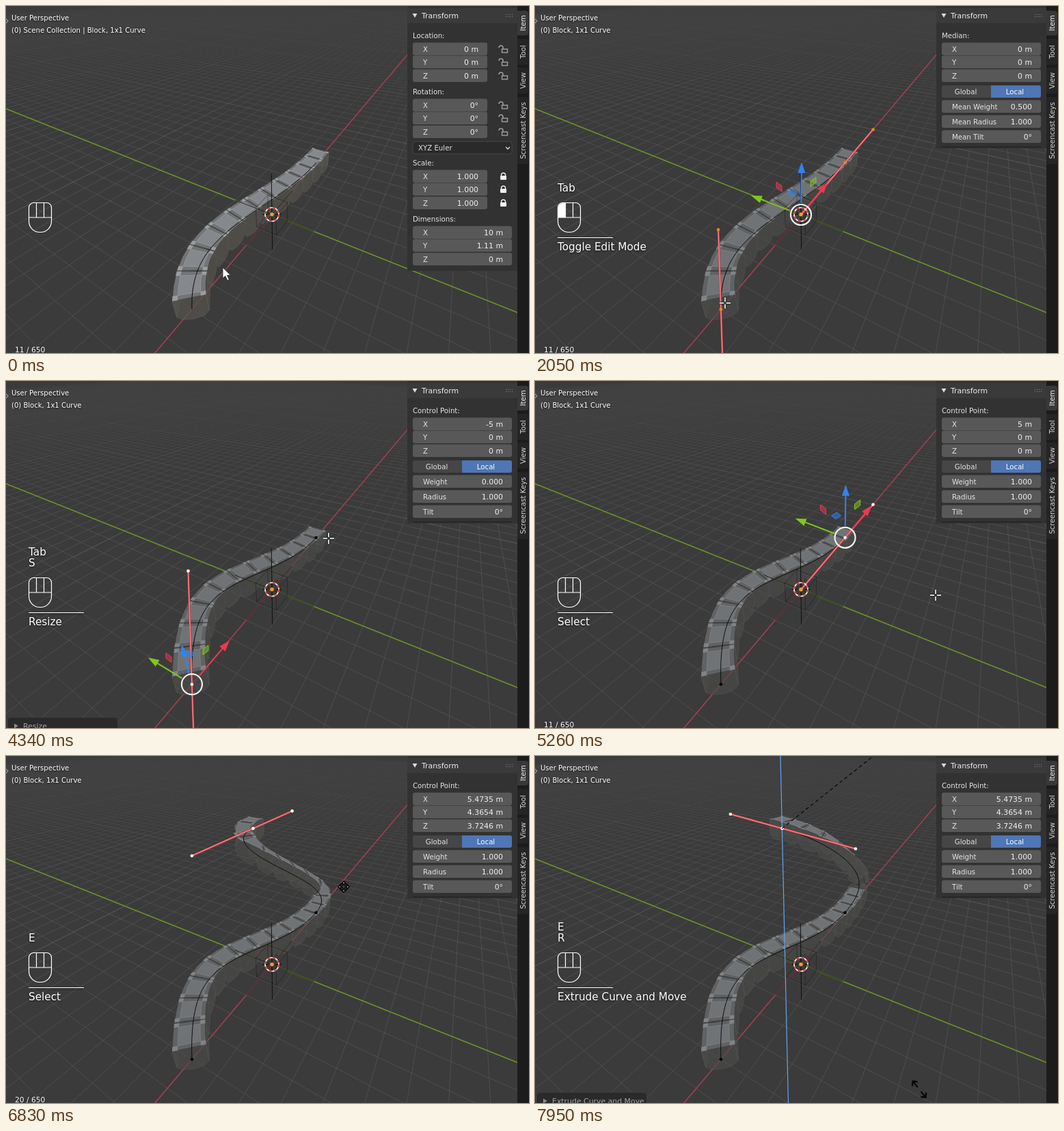
Animation of 765x507 px, one loop 8000 ms. Source, as an HTML page with a canvas:

```html
<!DOCTYPE html>
<html lang="en">
<head>
<meta charset="utf-8">
<title>Curve blocks</title>
<style>
html, body { margin: 0; width: 765px; height: 507px; overflow: hidden; background: #3b3b3b; }
canvas { display: block; }
</style>
</head>
<body>
<canvas id="stage" width="765" height="507"></canvas>
<script>
const ctx = document.getElementById('stage').getContext('2d');
const W = 765, H = 507, LOOP = 8000;
const FONT = '"DejaVu Sans", sans-serif';
const T = { click: 1000, edit: 1640, pick: 2110, scale: 2740, scaled: 3850, pick2: 4560,
            clear: 5100, extrude: 5600, placed: 6900, rotate: 7100 };

// ---- vectors and camera
const add = (a, b, k = 1) => a.map((v, i) => v + b[i] * k);
const cross = (a, b) => [a[1] * b[2] - a[2] * b[1], a[2] * b[0] - a[0] * b[2], a[0] * b[1] - a[1] * b[0]];
const unit = a => { const l = Math.hypot(...a) || 1; return a.map(v => v / l); };
const mix = (a, b, k) => a.map((v, i) => v + (b[i] - v) * k);
const depth = p => 1 + 0.0578 * p[0] + 0.0337 * p[1] - 0.042 * p[2];
function project(p) {
  const w = depth(p);
  return [(389 + 39.13 * p[0] - 15.69 * p[1] - 16.7 * p[2]) / w,
          (305 - 2.02 * p[0] - 1.18 * p[1] - 40.4 * p[2]) / w];
}

// piecewise linear track of [time, ...values]
function track(keys, t) {
  let i = 0;
  while (i < keys.length - 1 && keys[i + 1][0] <= t) i++;
  const a = keys[i], b = keys[i + 1];
  if (!b || t <= a[0]) return a.slice(1);
  return mix(a, b, (t - a[0]) / (b[0] - a[0])).slice(1);
}
const pointerPath = [
  [370, 317, 382], [580, 300, 353], [1550, 300, 353], [1990, 278, 434], [2130, 278, 434],
  [2320, 368, 425], [2470, 526, 404], [2740, 526, 404], [3420, 647, 380], [3700, 690, 374],
  [3850, 690, 374], [4340, 472, 230], [4480, 454, 228], [4640, 454, 228], [5260, 586, 313],
  [5600, 587, 310], [5990, 605, 270], [6830, 494, 191], [7100, 482, 204], [7550, 615, 150], [7950, 562, -53]];
const extrudePath = [[5600, 5, 0, 0], [5990, 6.0814, -0.14641, 1.2441], [6830, 5.4735, 4.3654, 3.7246]];

// ---- drawing helpers
function trace(pts, close) {
  ctx.beginPath();
  pts.forEach(p => ctx.lineTo(p[0], p[1]));
  if (close) ctx.closePath();
}
function line(pts, color, width = 1) {
  trace(pts); ctx.strokeStyle = color; ctx.lineWidth = width; ctx.stroke();
}
function shape(pts, fill, stroke, width = 1) {
  trace(pts, true);
  if (fill) { ctx.fillStyle = fill; ctx.fill(); }
  if (stroke) { ctx.strokeStyle = stroke; ctx.lineWidth = width; ctx.stroke(); }
}
function disc(p, r, fill, stroke, width = 1) {
  ctx.beginPath(); ctx.arc(p[0], p[1], r, 0, 7);
  if (fill) { ctx.fillStyle = fill; ctx.fill(); }
  if (stroke) { ctx.strokeStyle = stroke; ctx.lineWidth = width; ctx.stroke(); }
}
function box(x, y, w, h, fill, r = 0, stroke) {
  ctx.beginPath(); ctx.roundRect(x, y, w, h, r);
  ctx.fillStyle = fill; ctx.fill();
  if (stroke) { ctx.strokeStyle = stroke; ctx.lineWidth = 1; ctx.stroke(); }
}
function text(s, x, y, size = 10.2, color = '#e4e4e4', align = 'left') {
  ctx.font = `${size}px ${FONT}`; ctx.textAlign = align; ctx.fillStyle = color; ctx.fillText(s, x, y);
}
function shadowed(draw) {
  ctx.shadowColor = 'rgba(0,0,0,.7)'; ctx.shadowBlur = 3; ctx.shadowOffsetY = 1;
  draw();
  ctx.shadowColor = 'transparent'; ctx.shadowBlur = ctx.shadowOffsetY = 0;
}
function segment(a, b, color, width) {
  const near = 0.12, wa = depth(a), wb = depth(b);
  if (wa < near && wb < near) return;
  if (wa < near) a = mix(a, b, (near - wa) / (wb - wa));
  if (wb < near) b = mix(b, a, (near - wb) / (depth(a) - wb));
  line([project(a), project(b)], color, width);
}

// ---- floor
function floor() {
  const far = 120;
  for (let i = -70; i <= 110; i++) {
    if (!i) continue;
    const color = i % 10 ? 'rgba(94,94,94,.55)' : 'rgba(100,100,100,.75)';
    segment([-far, i, 0], [far, i, 0], color);
    segment([i, -far, 0], [i, far, 0], color);
  }
  const haze = ctx.createLinearGradient(0, 0, 0, 240);
  haze.addColorStop(0, 'rgba(59,59,59,.86)');
  haze.addColorStop(1, 'rgba(59,59,59,0)');
  ctx.fillStyle = haze; ctx.fillRect(0, 0, W, 240);
  segment([-far, 0, 0], [far, 0, 0], '#a8424f', 1.5);
  segment([0, -far, 0], [0, far, 0], '#68922c', 1.6);
}

// ---- curve
function sampleCurve(nodes) {
  const out = [], n = 64;
  for (let k = 0; k + 1 < nodes.length; k++) {
    const a = nodes[k], b = nodes[k + 1];
    for (let i = k ? 1 : 0; i <= n; i++) {
      const t = i / n, q = 1 - t;
      const pos = [0, 1, 2].map(c => q * q * q * a.at[c] + 3 * q * q * t * a.right[c] +
        3 * q * t * t * b.left[c] + t * t * t * b.at[c]);
      out.push({ pos, s: 0 });
    }
  }
  out.forEach((o, i) => {
    const prev = out[Math.max(0, i - 1)], next = out[Math.min(out.length - 1, i + 1)];
    o.dir = unit(add(next.pos, prev.pos, -1));
    o.side = unit(cross([0, 0, 1], o.dir));
    o.up = cross(o.dir, o.side);
    if (i) o.s = prev.s + Math.hypot(...add(o.pos, prev.pos, -1));
  });
  return out;
}
function place(curve, s, a, b) {
  const last = curve[curve.length - 1];
  let i = curve.findIndex(o => o.s >= s);
  if (i < 0) i = curve.length - 1;
  const o = curve[i], prev = curve[Math.max(0, i - 1)];
  let p;
  if (s > last.s) p = add(last.pos, last.dir, s - last.s);
  else p = i ? mix(prev.pos, o.pos, (s - prev.s) / (o.s - prev.s || 1)) : o.pos;
  return add(add(p, o.side, a), o.up, b);
}

// ---- blocks along the curve
const U = [[0, .5], [1, .5], [1, -.25], [.84, -.43], [.5, -.5], [.16, -.43], [0, -.25]];
function blockFaces(curve, i, count) {
  const at = (s, a, b) => place(curve, i + .02 + s * .96, a, b);
  const wall = a => U.map(([s, b]) => project(at(s, a, b)));
  const cap = s => U.map(([a, b]) => project(at(s, a - .5, b)));
  const patch = (s0, s1, a0, a1) => {
    const mid = (s0 + s1) / 2;
    return [[s0, a0], [mid, a0], [s1, a0], [s1, a1], [mid, a1], [s0, a1]].map(([s, a]) => project(at(s, a, .5)));
  };
  const walls = [wall(.5), wall(-.5)];
  if (i === count - 1) walls.unshift(cap(1));
  if (i === 0) walls.push(cap(0));
  const top = patch(0, 1, -.5, .5);
  const area = top.reduce((sum, p, k) => {
    const q = top[(k + 1) % top.length];
    return sum + p[0] * q[1] - q[0] * p[1];
  }, 0);
  return { walls, top, patch, front: area < 0, far: depth(place(curve, i + .5, 0, 0)) };
}
function chain(curve, count, edit, outlined) {
  const blocks = Array.from({ length: count }, (_, i) => blockFaces(curve, i, count)).sort((a, b) => b.far - a.far);
  if (outlined) {
    blocks.forEach(b => [...b.walls, b.top].forEach(f => shape(f, null, '#ed8a2e', 3)));
    blocks.forEach(b => [...b.walls, b.top].forEach(f => shape(f, '#3b3b3b')));
  }
  const look = edit
    ? { wall: 'rgba(76,76,74,.6)', edge: 'rgba(104,104,102,.3)', rim: '#606264', panel: '#707376', stud: '#818385' }
    : { wall: 'rgba(84,83,76,.7)', edge: 'rgba(112,110,102,.38)', rim: '#727477', panel: '#85888c', stud: '#9b9d9f' };
  const walls = b => b.walls.forEach(f => shape(f, look.wall, look.edge, .8));
  for (const b of blocks) {
    if (!b.front) { shape(b.top, '#4b4b4a'); walls(b); continue; }
    walls(b);
    shape(b.top, look.rim, 'rgba(50,50,50,.6)', .7);
    shape(b.patch(.16, .84, -.34, .34), look.panel, look.stud, .8);
    for (const s of [0, .84]) for (const a of [-.5, .34]) shape(b.patch(s, s + .16, a, a + .16), look.stud);
  }
}

function emptyAxes() {
  const dark = 'rgba(15,15,15,.75)';
  segment([-2, 0, 0], [2, 0, 0], dark, 1);
  segment([0, -2, 0], [0, 2, 0], dark, 1);
  segment([0, 0, -2], [0, 0, 2], '#111', 1);
  const r = .5;
  for (const a of [-r, r]) for (const b of [-r, r]) {
    segment([-r, a, b], [r, a, b], 'rgba(15,15,15,.5)', .8);
    segment([a, -r, b], [a, r, b], 'rgba(15,15,15,.5)', .8);
    segment([a, b, -r], [a, b, r], 'rgba(15,15,15,.5)', .8);
  }
}
function cursor3d() {
  const c = [389, 304.5];
  [[1, 0], [-1, 0], [0, 1], [0, -1]].forEach(([x, y]) =>
    line([[c[0] + x * 5, c[1] + y * 5], [c[0] + x * 14, c[1] + y * 14]], '#151515'));
  disc(c, 10, null, '#f4f4f4', 1.6);
  ctx.setLineDash([4, 4]); disc(c, 10, null, '#e0302c', 1.6); ctx.setLineDash([]);
  disc(c, 2.8, '#f39a2d');
}

function gizmo(c, bent) {
  const sets = bent
    ? { '#ee3850': [55, -64, -34, -39], '#7fc81c': [-64, -39, 20, -50], '#3084ee': [-15, -58, -3, -44] }
    : { '#ee3850': [39, -47, -32, -41], '#7fc81c': [-73, -28, 18, -48], '#3084ee': [1, -77, -13, -32] };
  for (const [color, [x, y, px, py]] of Object.entries(sets)) {
    const l = Math.hypot(x, y), d = [x / l, y / l], n = [-d[1], d[0]];
    const at = (r, k = 0) => [c[0] + d[0] * r + n[0] * k, c[1] + d[1] * r + n[1] * k];
    line([at(17), at(l - 15)], color, 2);
    shape([at(l), at(l - 16, 5.5), at(l - 16, -5.5)], color);
    const q = [c[0] + px, c[1] + py], k = color === '#7fc81c' ? -3 : 3;
    ctx.globalAlpha = .5;
    const quad = color === '#3084ee'
      ? [[q[0] - 7, q[1]], [q[0] + 1, q[1] - 5], [q[0] + 7, q[1]], [q[0] - 1, q[1] + 5]]
      : [[q[0] - 4, q[1] - 4 - k], [q[0] + 4, q[1] - 4 + k], [q[0] + 4, q[1] + 4 + k], [q[0] - 4, q[1] + 4 - k]];
    shape(quad, color);
    ctx.globalAlpha = 1;
    shape(quad, null, color, 1);
  }
  disc(c, 15, null, '#f0f0f0', 2.2);
}
function editPoints(nodes, selected) {
  const all = selected === 'all';
  nodes.forEach((node, i) => {
    const c = project(node.at);
    if (!all && i !== selected) { disc(c, 2.4, '#080808'); return; }
    segment(node.left, node.right, '#b8323c', 2.8);
    segment(node.left, node.right, '#ff8088', 1.5);
    const color = all ? '#f5821f' : '#fff';
    [node.left, node.at, node.right].filter(p => depth(p) > .12).forEach(p => disc(project(p), 2.3, color));
  });
}

// ---- pointers
function arrowPointer([x, y]) {
  const p = [[0, 0], [0, 16], [3.8, 12.6], [6.8, 19], [9.4, 17.8], [6.6, 11.6], [11.5, 11.3]];
  shape(p.map(q => [x + q[0], y + q[1]]), '#fff', '#333', 1);
}
function crossPointer([x, y]) {
  for (const [color, width] of [['#222', 3.4], ['#fff', 1.6]])
    [[1, 0], [-1, 0], [0, 1], [0, -1]].forEach(([a, b]) =>
      line([[x + a * 2, y + b * 2], [x + a * 8, y + b * 8]], color, width));
}
function movePointer([x, y]) {
  for (let i = 0; i < 4; i++) {
    ctx.save();
    ctx.translate(x, y); ctx.rotate(i * Math.PI / 2);
    shape([[0, -8], [3.5, -4.5], [-3.5, -4.5]], '#fff', '#0a0a0a', 1.8);
    ctx.restore();
  }
  disc([x, y], 2.6, null, '#0a0a0a', 1.2);
}
function doubleArrow([x, y], angle) {
  ctx.save();
  ctx.translate(x, y); ctx.rotate(angle);
  for (const k of [-1, 1]) {
    line([[k * 4, 0], [k * 15, 0]], '#050505', 2);
    line([[k * 10, -5], [k * 15, 0], [k * 10, 5]], '#050505', 2.4);
  }
  ctx.restore();
}
function dashed(a, b) {
  ctx.setLineDash([5, 4]); line([a, b], '#070707', 1.2); ctx.setLineDash([]);
}

// ---- interface
const number = v => Math.abs(v) < 1e-9 ? '0' : String(+v.toPrecision(5));
function field(y, label, value, right = 740, r = 3) {
  box(595, y - 9.5, right - 595, 18.5, '#585858', r);
  text(label, 610, y + 4);
  text(value, right - 13, y + 4, 10.9, '#f0f0f0', 'right');
}
const fields = (ys, values, right) => ys.forEach((y, i) => field(y, 'XYZ'[i], values[i], right));
function lock(y, closed) {
  const color = closed ? '#f2f2f2' : '#a0a0a0';
  ctx.beginPath();
  ctx.arc(closed ? 727.5 : 724, y - 2, 3, Math.PI, 0);
  if (closed) { ctx.lineTo(730.5, y); ctx.moveTo(724.5, y - 2); ctx.lineTo(724.5, y); }
  else ctx.lineTo(727, y);
  ctx.strokeStyle = color; ctx.lineWidth = 1.4; ctx.stroke();
  if (closed) box(723, y - 1, 9, 6, color, 1);
  else ctx.strokeRect(725.5, y, 8, 5);
}
function sidebar(edit, selected, point) {
  box(587, 0, 161, edit ? 208 : 387, '#323232');
  box(587, 3, 161, 22, '#3a3a3a');
  shape([[594.5, 11], [601.5, 11], [598, 17]], '#ddd');
  text('Transform', 608, 18, 10.9, '#eee');
  for (let i = 0; i < 4; i++) for (const y of [12, 15]) box(731 + i * 3, y, 1, 1, '#888');
  const rows = [63, 82, 102];
  if (edit) {
    const mean = selected === 'all';
    text(mean ? 'Median:' : 'Control Point:', 595, 47);
    fields(rows, point.map(v => number(v) + ' m'));
    box(595, 116, 72, 18, '#464646', [3, 0, 0, 3]);
    box(667, 116, 73, 18, '#4f76b5', [0, 3, 3, 0]);
    text('Global', 630, 129, 10.2, '#e4e4e4', 'center');
    text('Local', 702, 129, 10.2, '#fff', 'center');
    const pre = mean ? 'Mean ' : '';
    field(147, pre + 'Weight', mean ? '0.500' : selected ? '1.000' : '0.000');
    field(169, pre + 'Radius', '1.000');
    field(191, pre + 'Tilt', '0°');
    box(595, 205, 145, 2, '#282828');
  } else {
    const group = (label, y, values, right) => {
      text(label, 595, y - 16);
      fields([y, y + 19, y + 39], values, right);
    };
    group('Location:', 63, Array(3).fill('0 m'), 704);
    group('Rotation:', 145, Array(3).fill('0°'), 704);
    group('Scale:', 249, Array(3).fill('1.000'), 704);
    group('Dimensions:', 331, ['10 m', '1.11 m', '0 m']);
    for (const d of [0, 19, 39]) { lock(63 + d); lock(145 + d); lock(249 + d, true); }
    box(595, 198, 145, 18, '#2a2a2a', 3, '#474747');
    text('XYZ Euler', 603, 211);
    line([[731, 206], [734, 209], [737, 206]], '#ddd', 1.3);
  }
  box(748, 0, 17, H, '#1c1c1c');
  const tabs = [['Item', 25, 36], ['Tool', 67, 38], ['View', 109, 38], ['Screencast Keys', 182, 98]];
  tabs.forEach(([name, y, h], i) => {
    box(748, y - h / 2, 16, h, i ? '#252525' : '#383838', [0, 4, 4, 0]);
    ctx.save();
    ctx.translate(760, y); ctx.rotate(-Math.PI / 2);
    text(name, 0, 0, 10.2, i ? '#d4d4d4' : '#f0f0f0', 'center');
    ctx.restore();
  });
}
function screencast(keys, operator, pressed) {
  shadowed(() => {
    keys.forEach((key, i) => text(key, 33, 271 - 16 * (keys.length - 1 - i), 15.25, '#fff'));
    if (operator) { line([[33, 338.5], [114, 338.5]], '#fff'); text(operator, 33, 357, 15.25, '#fff'); }
  });
  ctx.beginPath(); ctx.roundRect(33.5, 287.5, 33, 43, [7, 7, 16, 16]);
  ctx.strokeStyle = '#fff'; ctx.lineWidth = 1.2; ctx.stroke();
  line([[33.5, 309], [66.5, 309]], '#fff', 1.2);
  for (const x of [44.5, 55.5]) line([[x, 288], [x, 309]], '#fff', 1.2);
  if (pressed) box(34, 288, 11, 21, '#fff', [7, 0, 0, 0]);
}
function operatorPanel(name) {
  box(3, 492, 160, 24, '#2a2a2a', 4);
  shape([[12, 500.5], [12, 507.5], [18, 504]], '#8a8a8a');
  text(name, 25, 508, 10.9, '#a2a2a2');
}
function statusAt(t) {
  const keys = t < T.edit ? [] : t < T.scale ? ['Tab'] : t < T.clear ? ['Tab', 'S']
    : t < T.extrude ? [] : t < T.rotate ? ['E'] : ['E', 'R'];
  const operator = t < T.click ? '' : t < T.edit ? 'Select' : t < T.pick ? 'Toggle Edit Mode'
    : t < T.scaled ? 'Select' : t < T.pick2 ? 'Resize' : t < T.placed ? 'Select' : 'Extrude Curve and Move';
  const pressed = [[950, 1100], [2030, 2150], [3800, 3900], [4500, 4620], [6860, 6960]].some(([a, b]) => t >= a && t < b);
  return { keys, operator, pressed };
}

function draw(t) {
  const mouse = track(pointerPath, t);
  const edit = t >= T.edit;
  const scaling = t >= T.scale && t < T.scaled;
  const extruding = t >= T.extrude && t < T.placed;
  const rotating = t >= T.rotate;

  const pivot = [272, 443];
  const reach = track(pointerPath, Math.min(Math.max(t, T.scale), T.scaled));
  const size = 2.5 * Math.hypot(reach[0] - pivot[0], reach[1] - pivot[1]) / Math.hypot(254, 39);
  const nodes = [
    { at: [-5, 0, 0], left: [-5 - size, -size, 0], right: [-5 + size, size, 0] },
    { at: [5, 0, 0], left: [0, 0, 0], right: [10, 0, 0] }];
  const end = track(extrudePath, t), endXY = [361, 106];
  if (t >= T.extrude) {
    const bearing = m => Math.atan2(endXY[1] - m[1], m[0] - endXY[0]);
    const turn = rotating ? bearing(mouse) - bearing(track(pointerPath, T.rotate)) : 0;
    const arm = [5 * Math.cos(turn), 5 * Math.sin(turn), 0];
    nodes.push({ at: end, left: add(end, arm, -1), right: add(end, arm) });
  }
  const selected = t < T.pick ? 'all' : t < T.pick2 ? 0 : t < T.extrude ? 1 : 2;
  const center = selected === 'all' ? [0, 0, 0] : nodes[selected].at;
  const curve = sampleCurve(nodes);
  const count = Math.ceil(curve[curve.length - 1].s - .02);

  ctx.fillStyle = '#3b3b3b'; ctx.fillRect(0, 0, W, H);
  floor();
  chain(curve, count, edit, t >= T.click && !edit);
  emptyAxes();
  line(curve.map(o => project(o.pos)), '#0c0c0c', 1);
  if (rotating) line([[359, 0], [370.5, H]], '#62a6ee', 1.2);
  if (edit) editPoints(nodes, selected);
  cursor3d();
  if (edit && !scaling && !extruding && !rotating) gizmo(project(center), selected === 0);

  const shown = [mouse[0], mouse[1] < 0 ? mouse[1] + 540 : mouse[1]];
  if (scaling) dashed(pivot, mouse);
  if (rotating) dashed(endXY, mouse);

  shadowed(() => {
    text('User Perspective', 8, 21, 10.05, '#fff');
    text(edit ? '(0) Block, 1x1 Curve' : '(0) Scene Collection | Block, 1x1 Curve', 8, 39, 10.05, '#fff');
    text(count + ' / 650', 13, 506, 10.7, '#fff');
  });
  line([[-1, 18], [3, 22], [-1, 26]], '#999', 1.2);
  const status = statusAt(t);
  screencast(status.keys, status.operator, status.pressed);
  if (t >= T.scaled && t < T.pick2) operatorPanel('Resize');
  if (t >= T.placed) operatorPanel('Extrude Curve and Move');
  sidebar(edit, selected, center);

  if (!edit) arrowPointer(shown);
  else if (scaling) doubleArrow(shown, Math.atan2(mouse[1] - pivot[1], mouse[0] - pivot[0]));
  else if (rotating) doubleArrow(shown, Math.atan2(mouse[1] - endXY[1], mouse[0] - endXY[0]) + Math.PI / 2);
  else if (extruding) movePointer(shown);
  else crossPointer(shown);
}

const start = performance.now();
function frame() {
  draw((performance.now() - start) % LOOP);
  requestAnimationFrame(frame);
}
frame();
</script>
</body>
</html>
```
